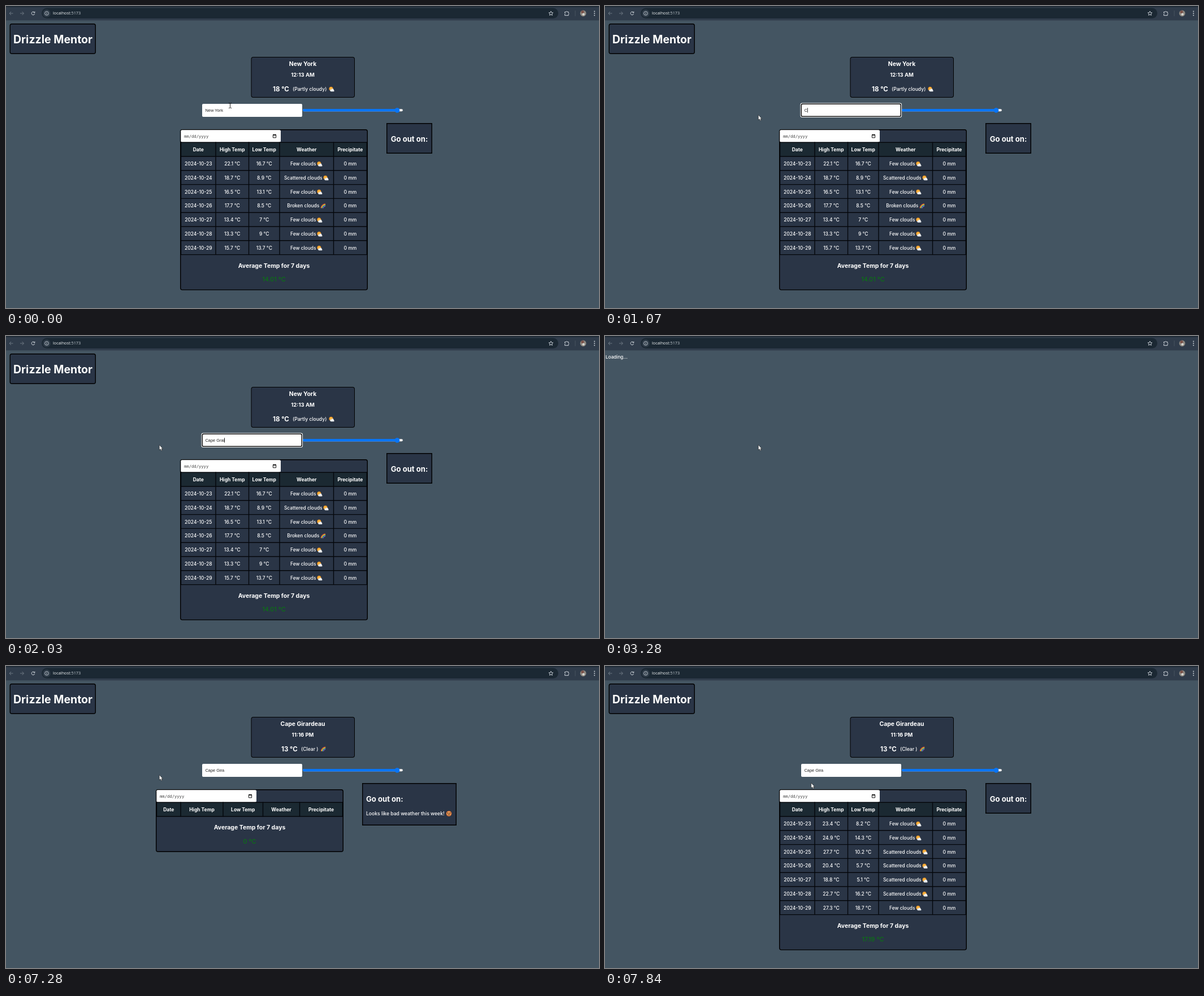
Recreate the animation shown at these times as an HTML page with a canvas. Size 1049 by 534 pixels, loop 7990 ms.

```html
<!DOCTYPE html>
<html lang="en">
<head>
<meta charset="utf-8">
<title>Drizzle Mentor</title>
<style>
  html, body { margin: 0; width: 100%; height: 100%; overflow: hidden; background: #445562; }
  canvas { display: block; }
</style>
</head>
<body>
<canvas id="stage" width="1049" height="534"></canvas>
<script>
const ctx = document.getElementById('stage').getContext('2d');
const LOOP = 7990, PAGE = '#445562', BOX = '#2a3546', HEAD = '#1b2932', BORDER = 1.4;
const UI = 'Inter, sans-serif', FIELD = '"Liberation Sans", Arial, sans-serif';

const NEW_YORK = {
  city: 'New York', time: '12:13 AM', temp: '18 °C', sky: '(Partly cloudy)', icon: sunCloud,
  left: 472, skyX: 507, iconX: 576, average: '14.01 °C',
  rows: ['22.1 16.7 Few', '18.7 8.9 Scattered', '16.5 13.1 Few', '17.7 8.5 Broken',
         '13.4 7 Few', '13.3 9 Few', '15.7 13.7 Few']
};
const CAPE = {
  city: 'Cape Girardeau', time: '11:16 PM', temp: '13 °C', sky: '(Clear )', icon: rainbow,
  left: 487, skyX: 522, iconX: 561, average: '17.19 °C',
  rows: ['23.4 8.2 Few', '24.9 14.3 Few', '27.7 10.2 Scattered', '20.4 5.7 Scattered',
         '18.8 5.1 Scattered', '22.7 16.2 Scattered', '27.3 18.7 Few']
};

// [start time, field text]
const TYPING = [[0, 'New York'], [1070, 'C'], [1200, 'Ca'], [1350, 'Cap'], [1480, 'Cape '],
  [1750, 'Cape Gra'], [2030, 'Cape Grai'], [2300, 'Cape Gra'], [2430, 'Cape Gr'],
  [2550, 'Cape G'], [2850, 'Cape Gir'], [3000, 'Cape Gira']];

function text(s, x, y, size, weight = 500, align = 'center', color = '#fff', family = UI) {
  ctx.font = `${weight} ${size}px ${family}`;
  ctx.textAlign = align;
  ctx.fillStyle = color;
  ctx.fillText(s, x, y + size * 0.36);
  return ctx.measureText(s).width;
}

function rect(x, y, w, h, fill, radius = 0) {
  ctx.fillStyle = fill;
  ctx.beginPath();
  ctx.roundRect(x, y, w, h, radius);
  ctx.fill();
}

function framed(x, y, w, h, border, radius) {
  rect(x, y, w, h, '#000', radius);
  rect(x + border, y + border, w - 2 * border, h - 2 * border, BOX, Math.max(0, radius - border));
}

function disc(x, y, r, fill) {
  ctx.fillStyle = fill;
  ctx.beginPath();
  ctx.arc(x, y, r, 0, 7);
  ctx.fill();
}

function path(d, x, y, stroke, fill, width = 1) {
  const p = new Path2D(d);
  ctx.save();
  ctx.translate(x, y);
  if (fill) { ctx.fillStyle = fill; ctx.fill(p); }
  if (stroke) { ctx.strokeStyle = stroke; ctx.lineWidth = width; ctx.stroke(p); }
  ctx.restore();
}

function sunCloud(x, y) {
  disc(x - 1, y - 0.8, 3.5, '#f09a2a');
  disc(x - 1, y - 0.8, 2.1, '#f9b944');
  disc(x - 1, y + 2.2, 1.8, '#e4e7ea');
  disc(x + 1.6, y + 1.6, 2.3, '#f1f2f4');
  rect(x - 2, y + 1.7, 6.6, 2.5, '#e9ecef', 1.25);
}

function rainbow(x, y) {
  ['#e8453c', '#f7a42b', '#f9e04b', '#4fb85b', '#3b8de0', '#9354c9'].forEach((color, i) => {
    ctx.strokeStyle = color;
    ctx.lineWidth = 1;
    ctx.beginPath();
    ctx.arc(x + 4.2, y + 4, 8 - i * 0.9, Math.PI * 1.02, Math.PI * 1.5);
    ctx.stroke();
  });
}

function angryFace(x, y) {
  disc(x, y, 4.8, '#d9662f');
  disc(x, y, 3.9, '#f0a05a');
  path('M-3 -2 L-.7 -.7 M3 -2 L.7 -.7 M-2 2.8 Q0 .8 2 2.8', x, y, '#4a2a20', null, 1);
  disc(x - 1.7, y, 0.8, '#4a2a20');
  disc(x + 1.7, y, 0.8, '#4a2a20');
}

function browserBar() {
  rect(0, 0, 1049, 25, '#303c4b');
  rect(0, 0, 1049, 2, '#1f2a35');
  rect(0, 25, 1049, 1, '#3b4957');
  rect(63, 3.5, 914, 18.5, '#1b2833', 9.25);
  const dim = '#6d7883', light = '#d5dbe1';
  path('M3.5 0H-3M0 -3L-3 0L0 3', 9, 13, dim);
  path('M-3.5 0H3M0 -3L3 0L0 3', 28.5, 13, dim);
  path('M2.1 -1.9A2.8 2.8 0 1 0 2.7 .8M2.9 -3.2V-1.1H.8', 48, 13, light);
  disc(72, 13, 6.8, '#2e3b48');
  path('M3.4 0A3.4 3.4 0 1 1 -3.4 0A3.4 3.4 0 1 1 3.4 0M0 -.5V2M0 -2V-1.2', 72, 13, light, null, 0.8);
  const font = '"Open Sans", sans-serif';
  const w = text('localhost', 83, 12.8, 7.3, 400, 'left', '#f0f3f5', font);
  text(':5173', 83 + w, 12.8, 7.3, 400, 'left', '#c3cbd2', font);
  path('M0 -3.8L1.1 -1.3L3.8 -1.1L1.8 .7L2.4 3.4L0 2L-2.4 3.4L-1.8 .7L-3.8 -1.1L-1.1 -1.3Z', 964, 13, light, null, 0.9);
  path('M-3.5 -2.5H-1Q0 -5 1 -2.5H3V-.5Q5.2 .5 3 1.6V3.7H-3.5V1.6Q-1.4 .5 -3.5 -.6Z', 992, 13, light);
  rect(1006.5, 8, 1, 10, '#465361');
  disc(1021, 13, 5.4, '#8b8780');
  disc(1020, 10.6, 2.6, '#7a5148');
  disc(1021.5, 14.6, 2.2, '#d4d6d2');
  for (const y of [9.5, 13, 16.5]) disc(1041, y, 0.9, light);
}

function cityField(value, focused, selected, caret) {
  if (focused) {
    rect(345.5, 171.5, 179.5, 25.5, '#fff', 3);
    rect(346.5, 172.5, 177.5, 23.5, '#101010', 2.5);
    rect(348, 174, 174.5, 20.5, '#fff', 1.5);
  } else rect(347, 173, 177, 23, '#fff', 2);
  if (selected) rect(352.5, 180, 32, 9, '#0078d7');
  const w = text(value, 352.5, 184.2, 7.4, 400, 'left', selected ? '#fff' : '#222', FIELD);
  if (caret) rect(352.5 + w, 180, 0.8, 8.5, '#000');
}

function slider() {
  rect(525, 182.1, 177, 4.4, '#b5b8bb', 2.2);
  rect(525.5, 182.6, 176, 3.4, '#f2f2f2', 1.7);
  rect(525, 182.1, 169, 4.4, '#0975f5', 2.2);
  disc(692, 184.3, 4.35, '#0975f5');
}

function tablePanel(x, columns, rows, average) {
  const pitch = 24.8, end = 266 + rows.length * pitch, mid = x + 166;
  framed(x, 218, 332, end + 63 - 218, BORDER, 4);
  rect(x + 1.3, 219.3, 176.7, 21.5, '#fff', 2);
  text('mm/dd/yyyy', x + 7, 230, 7.2, 400, 'left', '#444', '"DejaVu Sans Mono", monospace');
  path('M-2.6 -2.4H2.6V2.9H-2.6ZM-2.6 -1.7H2.6M-1.5 -3.4V-2M1.5 -3.4V-2', x + 167, 230, '#111', null, 1);

  rect(columns[0], 241, columns[5] - columns[0], 25, HEAD);
  for (const c of columns) rect(c - 0.7, 240.5, 1.4, end - 240, '#04070b');
  for (let i = -1; i <= rows.length; i++) {
    rect(columns[0], 265.3 + i * pitch, columns[5] - columns[0], 1.4, '#04070b');
  }
  const center = i => (columns[i] + columns[i + 1]) / 2;
  ['Date', 'High Temp', 'Low Temp', 'Weather', 'Precipitate']
    .forEach((s, i) => text(s, center(i), 254, 8.5, 700));
  rows.forEach((row, r) => {
    const [high, low, kind] = row.split(' '), y = 279 + r * pitch;
    text('2024-10-' + (23 + r), center(0), y, 8.5);
    text(high + ' °C', center(1), y, 8.5);
    text(low + ' °C', center(2), y, 8.5);
    const w = text(kind + ' clouds', center(3) - 6, y, 8.4);
    (kind === 'Broken' ? rainbow : sunCloud)(center(3) + w / 2 + 0.4, y + 0.3);
    text('0 mm', center(4), y, 8.5);
  });
  text('Average Temp for 7 days', mid, end + 19.3, 10.5, 700);
  text(average, mid, end + 43.8, 11, 400, 'center', '#067d0c');
}

function weatherPage(data, empty) {
  framed(6.5, 31, 152.5, 54, BORDER, 4);
  text('Drizzle Mentor', 83, 59, 19.5, 700);

  framed(433.5, 90, 183.5, 72, 1, 4);
  text(data.city, 525, 102.3, 10.4, 700);
  text(data.time, 525, 122, 9.5, 700);
  text(data.temp, data.left, 147, 11.5, 700, 'left');
  text(data.sky, data.skyX, 147, 8.6, 500, 'left');
  data.icon(data.iconX, 147);
  slider();

  if (empty) {
    tablePanel(265, [266.5, 309, 384, 454.5, 519.5, 595.5], [], '0 °C');
    framed(630, 207, 167, 75, BORDER, 0);
    text('Go out on:', 637, 235, 13.1, 700, 'left');
    text('Looks like bad weather this week!', 637, 261, 8.6, 500, 'left');
    angryFace(783.5, 261);
  } else {
    tablePanel(308, [309.5, 371, 429.5, 484, 579.5, 638.3], data.rows, data.average);
    framed(673, 207, 81, 54, BORDER, 0);
    text('Go out on:', 713.5, 235, 13.1, 700);
  }
}

function pointer(t) {
  if (t < 120) {
    path('M-2.5 -4.5Q0 -4.5 0 -3.5Q0 -4.5 2.5 -4.5M0 -3.5V3.5M-2.5 4.5Q0 4.5 0 3.5Q0 4.5 2.5 4.5',
      396.5, 176, '#111', null, 0.9);
  } else if (t >= 270) {
    const [x, y] = t < 420 ? [274.3, 192.6] : t < 7840 ? [271.2, 192.6] : [364.7, 206.8];
    path('M0 0V9L2 7.2L3.4 10.1L5 9.4L3.7 6.6H6.2Z', x, y, '#111', '#fff', 0.6);
  }
}

function draw(t) {
  rect(0, 0, 1049, 534, PAGE);
  browserBar();
  if (t >= 3280 && t < 7280) {
    text('Loading...', 1, 37, 8.2, 500, 'left');
  } else {
    weatherPage(t < 3280 ? NEW_YORK : CAPE, t >= 7280 && t < 7410);
    const value = TYPING.filter(step => step[0] <= t).pop()[1];
    const focused = t >= 270 && t < 3280;
    cityField(value, focused, focused && t < 1070, focused && t >= 1070);
  }
  pointer(t);
}

const start = performance.now();
function tick() {
  draw((performance.now() - start) % LOOP);
  requestAnimationFrame(tick);
}
tick();
</script>
</body>
</html>
```
